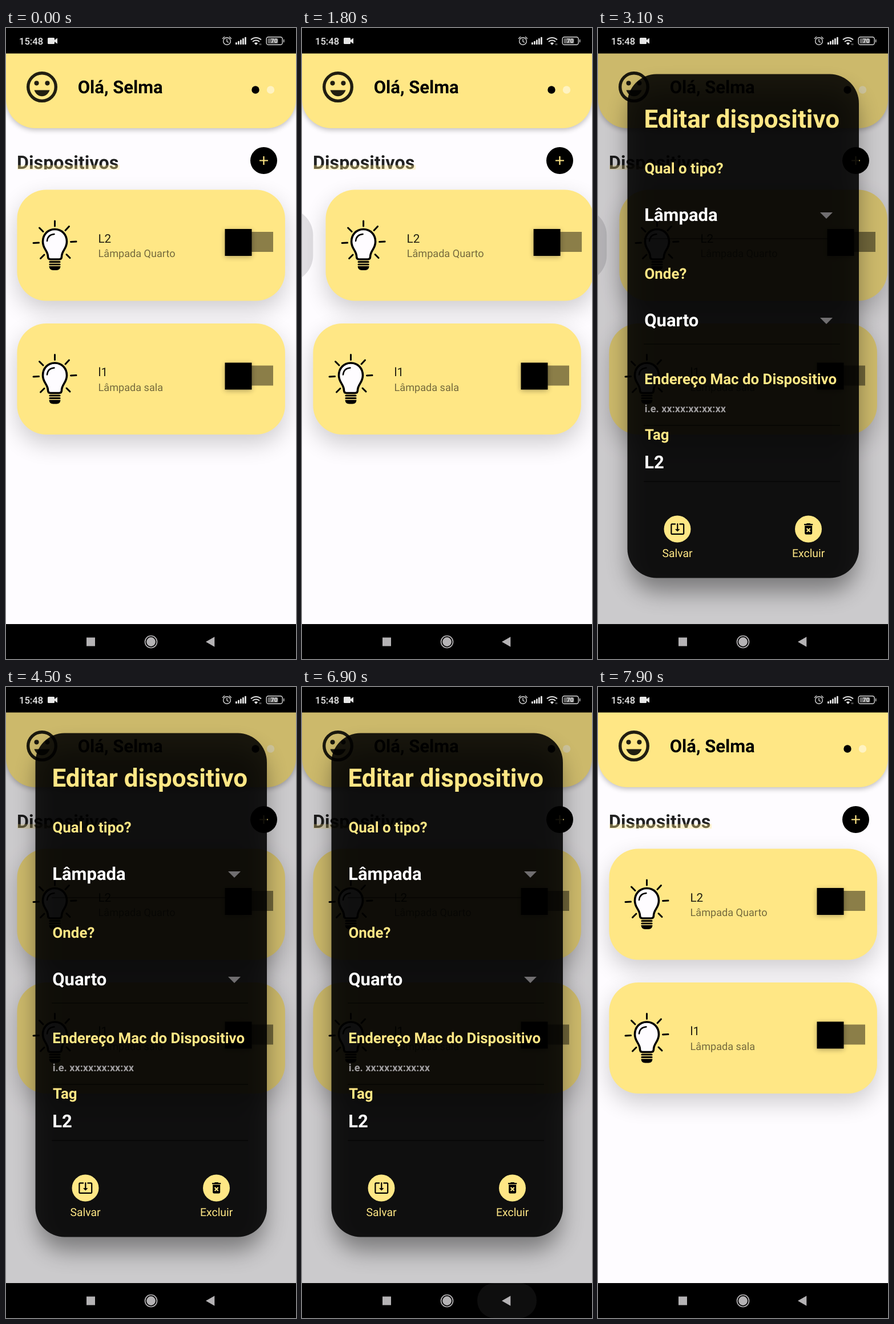
Animation, 508 px wide and 1102 px high, one loop 8000 ms. Source, as an HTML page:

```html
<!DOCTYPE html>
<html lang="pt">
<head>
<meta charset="utf-8">
<title>Dispositivos</title>
<style>
  html, body { margin: 0; width: 100%; height: 100%; overflow: hidden; background: #000; }
  svg { display: block; width: 100%; height: 100%; }
  text { font-family: Roboto, "Noto Sans", sans-serif; text-rendering: geometricPrecision; }
  .bold { font-weight: 700; }
  .mid { text-anchor: middle; }
  .line { fill: none; stroke: #000; stroke-linecap: round; }
</style>
</head>
<body>
<svg viewBox="0 0 508 1102">
  <defs>
    <filter id="soft" x="-20%" y="-40%" width="140%" height="180%"><feGaussianBlur stdDeviation="20"/></filter>
    <filter id="small" x="-30%" y="-30%" width="160%" height="160%"><feGaussianBlur stdDeviation="5"/></filter>
    <clipPath id="titleClip"><rect y="200" width="400" height="47"/></clipPath>
    <clipPath id="pageClip"><rect y="44" width="508" height="997"/></clipPath>

    <g id="bulb">
      <path class="line" stroke-width="3" d="M85.500 337v9M58.500 349l6.500 6.500M110.500 346.500l-6.500 7M48 375.500l9.500-.5M113.500 373.500l9.500-.5M60.500 402.500l6.500-6.500M106 395.500l6 6"/>
      <path d="M85.500 351.500C73 351.500 64.500 361 64.500 373C64.500 386 73 388 73.500 399Q73.500 404 78 404H93Q97.500 404 97.500 399C98 388 106.500 386 106.500 373C106.500 361 98 351.500 85.500 351.500Z" fill="#fefcff" stroke="#000" stroke-width="3.600"/>
      <path class="line" stroke-width="2.400" d="M72 372Q73 361 84.500 360"/>
      <path class="line" stroke-width="3.200" d="M77 408.500H94M77 413H94"/>
      <path d="M75.500 416H95.500Q95 423 88.500 423H82.500Q76 423 75.500 416Z"/>
    </g>

    <g id="switch">
      <rect x="430" y="356" width="38" height="35" fill="#8b7e48"/>
      <rect x="383.500" y="353" width="47" height="47" opacity=".3" filter="url(#small)"/>
      <rect x="383.500" y="351" width="47" height="47"/>
    </g>

    <g id="cardShape">
      <rect x="19.400" y="298.500" width="469.500" height="194" rx="51" opacity=".19" filter="url(#soft)"/>
      <rect x="19.400" y="282.500" width="469.500" height="194" rx="51" fill="#ffe785"/>
      <use href="#bulb"/>
      <use href="#switch"/>
    </g>
  </defs>

  <g clip-path="url(#pageClip)">
    <rect width="508" height="1102" fill="#fefcff"/>

    <!-- header -->
    <rect y="0" width="508" height="178" rx="51" opacity=".25" filter="url(#small)"/>
    <rect y="0" width="508" height="175" rx="51" fill="#ffe785"/>
    <g transform="translate(30.600 70.700) scale(2.700)" fill="#211e11">
      <circle cx="12" cy="12" r="9" fill="none" stroke="#211e11" stroke-width="2"/>
      <circle cx="8.500" cy="9.500" r="1.500"/>
      <circle cx="15.500" cy="9.500" r="1.500"/>
      <path d="M12 18c2.280 0 4.220-1.660 5-4H7c.780 2.340 2.720 4 5 4z"/>
    </g>
    <text class="bold" x="125.700" y="114" font-size="31">Olá, Selma</text>
    <circle cx="437" cy="108" r="6.700"/>
    <circle cx="463.500" cy="108" r="6.700" fill="#fff3c2"/>

    <!-- section title -->
    <text class="bold" x="19" y="245.500" font-size="32.300" fill="#212121" clip-path="url(#titleClip)">Dispositivos</text>
    <rect x="20" y="239.500" width="179" height="8" fill="#ffe785" opacity=".36"/>
    <circle cx="451.500" cy="231.500" r="23.500"/>
    <path d="M444 231.500h15M451.500 224v15" stroke="#ffe785" stroke-width="2.200"/>

    <!-- edit action, moves along with the first card -->
    <g id="action">
      <rect x="-122.700" y="315" width="122" height="129" rx="47" fill="#e0dee2"/>
      <path transform="translate(-77.500 354.500) scale(1.293)" d="M14.060 9.020l.920.920L5.920 19H5v-.920l9.060-9.060M17.660 3c-.250 0-.510.100-.700.290l-1.830 1.830 3.750 3.750 1.830-1.830c.390-.390.390-1.020 0-1.410l-2.340-2.340c-.200-.200-.450-.290-.710-.290zm-3.600 3.190L3 17.250V21h3.750L17.810 9.940l-3.750-3.750z"/>
      <text class="mid" x="-62" y="400.500" font-size="15.500">Editar</text>
    </g>
    <g id="cards"></g>

    <!-- dialog -->
    <g id="dialog">
      <rect width="508" height="1102" opacity=".2"/>
      <rect x="55" y="108" width="398" height="876" rx="50" opacity=".4" filter="url(#soft)"/>
      <rect x="51.500" y="80.500" width="405.500" height="880" rx="51" opacity=".88"/>
      <g id="form"></g>
      <path d="M80 368H424M80 552H424M80 694H424M80 792H424" stroke="#000" stroke-opacity=".6" stroke-width="1.300"/>
      <path d="M389 322h22l-11 11zM389 506h22l-11 11z" fill="#706e70"/>
      <g fill="#ffe785">
        <circle cx="139" cy="875" r="23.500"/>
        <circle cx="368.500" cy="875" r="23.500"/>
      </g>
      <path transform="translate(126.200 861.500) scale(1.090)" d="M12 16.500l4-4h-3v-9h-2v9H8l4 4zm9-13h-6v1.990h6v14.030H3V5.490h6V3.500H3c-1.100 0-2 .9-2 2v14c0 1.100.9 2 2 2h18c1.100 0 2-.9 2-2v-14c0-1.100-.9-2-2-2z"/>
      <path transform="translate(355.700 861.800) scale(1.080)" d="M6 19c0 1.100.9 2 2 2h8c1.100 0 2-.9 2-2V7H6v12zm2.460-7.120l1.410-1.410L12 12.590l2.120-2.120 1.410 1.410L13.410 14l2.120 2.120-1.410 1.410L12 15.410l-2.120 2.120-1.410-1.410L10.590 14l-2.130-2.120zM15.500 4l-1-1h-5l-1 1H5v2h14V4z"/>
    </g>
  </g>

  <!-- status bar -->
  <rect width="508" height="44.500"/>
  <g fill="#e6e6e6">
    <text x="23" y="28.500" font-size="16.600" font-weight="500">15:48</text>
    <path d="M74.500 17h9q1.500 0 1.500 1.500v2.500l5-3.500v10l-5-3.500v2.500q0 1.500-1.500 1.500h-9q-1.500 0-1.500-1.500v-8q0-1.500 1.500-1.500z"/>
    <g fill="none" stroke="#d8d8d8" stroke-width="1.400" stroke-linecap="round">
      <circle cx="387" cy="23" r="6.300"/>
      <path d="M387 19.500v4l2.500 1.500M379.500 18.500l3-3M394.500 18.500l-3-3"/>
      <rect x="456.200" y="15.700" width="28" height="13.600" rx="3.500"/>
      <path d="M486.700 20.500v4"/>
    </g>
    <g id="signal"></g>
    <path d="M429 20.500a13 13 0 0 1 18 0M432 24a8.500 8.500 0 0 1 12 0" fill="none" stroke="#e0e0e0" stroke-width="2"/>
    <path d="M434.800 26.500a4.600 4.600 0 0 1 6.400 0l-3.200 3.200z"/>
    <path d="M444.500 27v3M446.500 27v3" stroke="#aaa" stroke-width=".8"/>
    <rect x="458.500" y="18" width="18" height="9" rx="1.500" fill="#686868"/>
    <text class="mid bold" x="469.800" y="26.300" font-size="10.500">70</text>
  </g>

  <!-- navigation bar -->
  <rect y="1041" width="508" height="61"/>
  <rect id="ripple" x="307" y="1041" width="104" height="61" rx="30" fill="#0e0e0e"/>
  <g fill="#b5b3b5">
    <rect x="141" y="1064.500" width="15" height="15"/>
    <circle cx="254" cy="1072" r="7.900"/>
    <circle cx="254" cy="1072" r="10.500" fill="none" stroke="#b5b3b5" stroke-width="1.700"/>
    <path d="M350 1072l15.300-8.700v17.400z"/>
  </g>
</svg>
<script>
  const LOOP = 8000, STEP = 100;
  const DRAG_START = 1650, DRAG_TIME = 565, OPEN_WIDTH = 127;
  const DIALOG_OPEN = 3100, DIALOG_CLOSE = 7000;
  const $ = id => document.getElementById(id);
  const yellow = "#ffe785";

  const label = (x, y, size, str, fill, cls = "") =>
    `<text class="${cls}" x="${x}" y="${y}" font-size="${size}" fill="${fill}">${str}</text>`;

  const card = (id, dy, name, place) =>
    `<g id="${id}" transform="translate(0 ${dy})"><use href="#cardShape"/>` +
    label(161.4, 374.5, 20.7, name, "#211e11") +
    label(161.6, 400, 18.1, place, "#756a3d") + "</g>";

  $("cards").innerHTML =
    card("first", 0, "L2", "Lâmpada Quarto") + card("second", 233.5, "l1", "Lâmpada sala");

  $("form").innerHTML = [
    [80.5, 174, 44, "Editar dispositivo", yellow],
    [81.5, 254, 25.87, "Qual o tipo?", yellow],
    [81.2, 337, 31, "Lâmpada", "#fff"],
    [81.5, 438, 25.87, "Onde?", yellow],
    [81.2, 521, 31, "Quarto", "#fff"],
    [81.2, 622, 25.87, "Endereço Mac do Dispositivo", yellow],
    [81.7, 671, 18.1, "i.e. xx:xx:xx:xx:xx", "#9f9d9f"],
    [82, 719, 25.87, "Tag", yellow],
    [81.2, 769, 31, "L2", "#fff"]
  ].map(row => label(...row, "bold")).join("") +
    label(139, 924, 19.4, "Salvar", yellow, "mid") +
    label(368.7, 924, 19.4, "Excluir", yellow, "mid");

  $("signal").innerHTML = [0, 1, 2, 3, 4].map(i => {
    const h = 4 + i * 2.3;
    return `<rect x="${402 + i * 4}" y="${29 - h}" width="2.8" height="${h}" rx="1"/>`;
  }).join("");

  const clamp = v => Math.max(0, Math.min(1, v));
  const smooth = v => v * v * (3 - 2 * v);

  function cardOffset(t) {
    if (t >= DIALOG_OPEN) return 18 * clamp(1 - (t - DIALOG_OPEN) / 100);
    return OPEN_WIDTH * smooth(clamp((t - DRAG_START) / DRAG_TIME));
  }

  function dialogOpacity(t) {
    if (t < DIALOG_OPEN) return 0;
    return t < DIALOG_CLOSE ? 1 : clamp(0.4 - (t - DIALOG_CLOSE) / 250);
  }

  function rippleOpacity(t) {
    return clamp(Math.min((t - 6700) / 200, (7200 - t) / 300));
  }

  function draw(t) {
    const x = cardOffset(t);
    $("first").setAttribute("transform", `translate(${x} 0)`);
    $("action").setAttribute("transform", `translate(${x - 2} 0)`);
    $("action").setAttribute("visibility", x > 0 ? "visible" : "hidden");
    $("dialog").setAttribute("opacity", dialogOpacity(t));
    $("ripple").setAttribute("opacity", rippleOpacity(t));
  }

  const start = performance.now();
  function tick() {
    const t = (performance.now() - start) % LOOP;
    draw(Math.floor(t / STEP) * STEP);
    requestAnimationFrame(tick);
  }
  tick();
</script>
</body>
</html>
```
